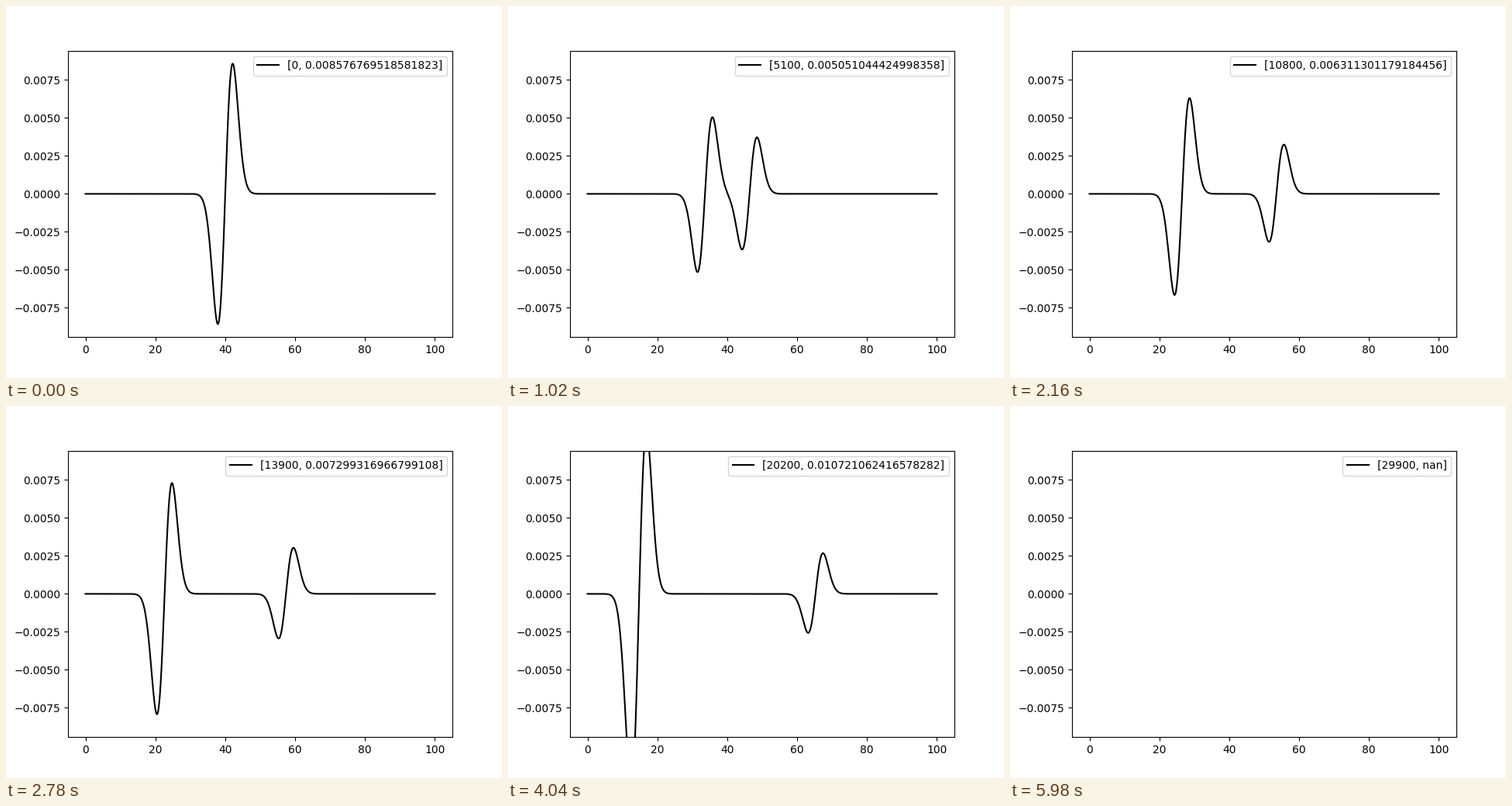
Animation, 640 px wide and 480 px high, one loop 6000 ms. Source, as a matplotlib script:

```python
import numpy as np
import matplotlib.pyplot as plt
from matplotlib.animation import FuncAnimation

FRAMES = 300
INTERVAL = 20          # ms
STEPS = 100            # solver steps per frame
C_DT = 0.00125         # distance travelled per step
DR = 0.1
R0, WIDTH, AMP = 40, 3, 0.03
LAG = 0.1              # delay of the ingoing pulse's trailing side
BLOWUP = 21000         # step at which the solution diverges

r = DR * np.arange(1001)
radius = np.maximum(r, DR)


def pulse(s):
    """r * u at rest: derivative of a Gaussian, weighted by radius."""
    x = s - R0
    return s * AMP * 2 * x / WIDTH**2 * np.exp(-(x / WIDTH) ** 2)


def solution(n):
    """Ingoing and outgoing halves of a spherical wave."""
    if n >= BLOWUP:
        return np.full_like(r, np.nan)
    d = C_DT * n
    trailing = 1 / (1 + np.exp(R0 - r - d))
    inner = radius - LAG * np.log(1 + d / radius) * trailing
    ingoing = pulse(inner + d) / inner
    outgoing = pulse(radius - d) / radius
    return (ingoing + outgoing) / 2


start = solution(0)
fig, ax = plt.subplots(figsize=(6.4, 4.8), dpi=100)
line, = ax.plot(r, start, color="black", label="[0, 0]")
lim = 1.1 * start.max()
ax.set_xlim(-5, 105)
ax.set_ylim(-lim, lim)
label = ax.legend(loc="upper right").get_texts()[0]


def update(i):
    n = i * STEPS
    u = solution(n)
    line.set_ydata(u)
    label.set_text(f"[{n}, {float(u.max())}]")
    return line, label


anim = FuncAnimation(fig, update, frames=FRAMES, interval=INTERVAL,
                     repeat=True, repeat_delay=0, blit=False)
plt.show()
```
